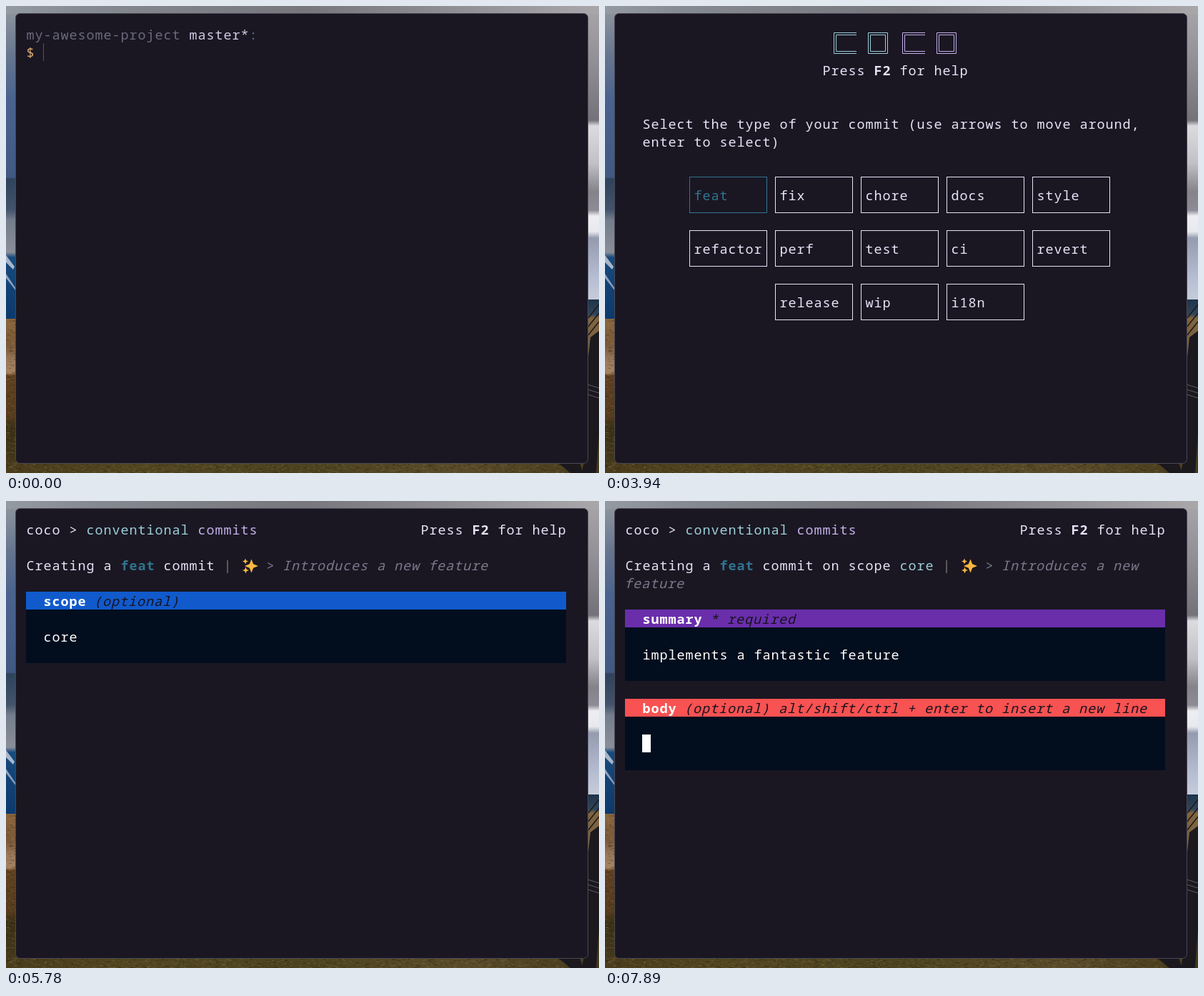
Write an HTML page with a canvas that moves like this. It is 830x654 px and loops after 8 s.

```html
<!DOCTYPE html>
<html lang="en">
<head>
<meta charset="utf-8">
<title>Terminal commit session</title>
<style>
  html, body { margin: 0; width: 100%; height: 100%; overflow: hidden; background: #1a1723; }
  canvas { display: block; }
</style>
</head>
<body>
<canvas id="stage" width="830" height="654"></canvas>
<script>
const LOOP = 8000, CELL_W = 12, CELL_H = 25, LEFT = 28, TOP = 27;
const C = {
  bg: '#1a1723', text: '#e6e3f6', muted: '#7b788a', foam: '#9ccfd8', iris: '#c4b0e8',
  pine: '#31748f', gold: '#dfae6c', white: '#ffffff', field: '#020d1d',
  blue: '#115acc', purple: '#6a2eab', red: '#f85252', ink: '#17131f'
};
const stage = document.getElementById('stage');
const backdrop = document.createElement('canvas');
backdrop.width = 830;
backdrop.height = 654;
let ctx;

const colX = col => LEFT + col * CELL_W;
const rowY = row => TOP + row * CELL_H;

function rect(x, y, w, h, color) {
  ctx.fillStyle = color;
  ctx.fillRect(x, y, w, h);
}

function polygon(color, ...points) {
  ctx.fillStyle = color;
  ctx.beginPath();
  points.forEach(([x, y]) => ctx.lineTo(x, y));
  ctx.fill();
}

function gradient(x, y, w, h, vertical, stops) {
  const g = vertical ? ctx.createLinearGradient(0, y, 0, y + h) : ctx.createLinearGradient(x, 0, x + w, 0);
  stops.forEach(([at, color]) => g.addColorStop((at - (vertical ? y : x)) / (vertical ? h : w), color));
  rect(x, y, w, h, g);
}

let seed = 9;
const random = () => (seed = seed * 16807 % 2147483647) / 2147483647;

function speckle(x, y, w, h, count, dark, light) {
  for (let i = 0; i < count; i++) {
    rect(x + random() * w, y + random() * h, 1 + random() * 4, 1, random() < .5 ? dark : light);
  }
}

// Terminal text: one glyph per grid cell.
function print(row, col, text, color = C.text, style = '500') {
  const slant = style === 'italic' ? -1.5 : 0;
  ctx.font = `${style} 18.5px "Noto Sans Mono", monospace`;
  ctx.textAlign = 'center';
  ctx.fillStyle = color;
  [...text].forEach((ch, i) => ctx.fillText(ch, colX(col + i) + CELL_W / 2 + slant, rowY(row) + 20));
  return col + text.length;
}

function paintBackdrop() {
  ctx = backdrop.getContext('2d');
  gradient(0, 0, 830, 12, false, [[0, '#949aa3'], [120, '#858991'], [420, '#77777d'], [650, '#929196'], [830, '#a9a7aa']]);
  gradient(0, 11, 15, 427, true, [[11, '#8b929c'], [70, '#66758f'], [130, '#4a638e'], [240, '#405983'],
    [242, '#30435c'], [285, '#42536b'], [300, '#747d8c'], [345, '#8a8e98'], [352, '#174a7c'], [438, '#0c396d']]);
  polygon('#a9b6c9', [0, 349], [12, 365], [10, 369], [0, 359]);
  polygon('#8ea2bd', [0, 375], [14, 396], [14, 399], [0, 381]);
  gradient(0, 438, 15, 216, true, [[438, '#8a653d'], [475, '#795837'], [495, '#97775a'], [514, '#a58360'],
    [517, '#5f4020'], [575, '#573c1e'], [590, '#383015'], [654, '#4a3c1d']]);
  gradient(813, 11, 17, 400, true, [[11, '#a5a3a7'], [80, '#918f95'], [160, '#747179'], [168, '#dcdcdf'],
    [220, '#c2c1c6'], [260, '#85828a'], [286, '#8d8b95'], [294, '#eeeef2'], [316, '#e8e9ee'],
    [325, '#959baf'], [380, '#b5bdd2'], [411, '#c6ccda']]);
  gradient(813, 411, 17, 243, true, [[411, '#1d344b'], [432, '#314558'], [437, '#80643d'],
    [500, '#756044'], [570, '#594525'], [654, '#403718']]);
  gradient(0, 639, 830, 15, false, [[0, '#493b1c'], [150, '#514620'], [420, '#4d4320'], [650, '#5a4c2b'], [830, '#463b1b']]);
  speckle(0, 641, 830, 13, 900, '#2f2a1480', '#786a3980');
  speckle(0, 438, 14, 203, 260, '#3a291460', '#b08a5840');

  const dark = '#1b191e';
  polygon(dark, [830, 455], [818, 464], [814, 500], [814, 610], [806, 654], [826, 654], [830, 600]);
  polygon(dark, [773, 640], [803, 640], [808, 654], [790, 654]);
  ctx.lineWidth = 1.5;
  ctx.strokeStyle = dark;
  ctx.beginPath();
  for (const y of [438, 450, 462]) {
    ctx.moveTo(814, y);
    ctx.lineTo(830, y - 20);
  }
  ctx.stroke();
  ctx.lineWidth = 1;
  ctx.strokeStyle = '#5c5c64';
  ctx.beginPath();
  for (const y of [530, 537, 544]) {
    ctx.moveTo(814, y);
    ctx.lineTo(830, y + 5);
  }
  ctx.stroke();

  ctx.fillStyle = C.bg;
  ctx.strokeStyle = '#4a4853';
  ctx.beginPath();
  ctx.roundRect(13.5, 10.5, 801, 630, 6);
  ctx.fill();
  ctx.stroke();
}

const ramp = (from, to, count) => Array.from({ length: count }, (_, i) => from + (to - from) * i / (count - 1));
const passed = (times, t) => times.filter(at => t >= at).length;

const COMMAND_KEYS = ramp(70, 330, 4);
const SCOPE_KEYS = [5260, 5390, 5520, 5520];
const SUMMARY = 'implements a fantastic feature';
const SUMMARY_KEYS = [...ramp(6350, 6470, 3), ...ramp(6530, 6830, 10),
  ...ramp(6990, 7290, 7), 7310, 7360, 7410, ...ramp(7570, 7810, 7)];
const MOVES = [[1610, 1], [1740, 2], [1870, 3], [2140, 2], [2340, 1], [2470, 0]];
const TYPES = [
  [7, 'feat fix chore docs style'],
  [7, 'refactor perf test ci revert'],
  [17, 'release wip i18n']
];

function drawPrompt(t) {
  print(0, 0, 'my-awesome-project', '#6b6a7a');
  print(0, 19, 'master*', '#d0cbe6');
  print(0, 26, ':', '#527293');
  print(1, 0, '$', C.gold);
  const end = print(1, 2, 'coco'.slice(0, passed(COMMAND_KEYS, t)));
  const entered = t >= 530;
  rect(colX(entered ? 0 : end), rowY(entered ? 2 : 1), 1, CELL_H, '#55525f');
}

function drawHelp(row, col) {
  print(row, col, 'Press');
  print(row, col + 6, 'F2', C.text, 'bold');
  print(row, col + 9, 'for help');
}

function bannerLetter(col, closed, color) {
  const x = colX(col) + 4.5;
  ctx.strokeStyle = color;
  ctx.lineWidth = 1;
  for (const inset of [0, 3]) {
    const left = x + inset, top = 37.5 + inset, bottom = 66.5 - inset;
    const right = closed ? x + 27 - inset : x + 31.5;
    ctx.beginPath();
    ctx.moveTo(right, top);
    ctx.lineTo(left, top);
    ctx.lineTo(left, bottom);
    ctx.lineTo(right, bottom);
    if (closed) ctx.closePath();
    ctx.stroke();
  }
}

function drawPicker(t) {
  [24, 28, 32, 36].forEach((col, i) => bannerLetter(col, i % 2 === 1, i < 2 ? C.foam : C.iris));
  drawHelp(2, 23);
  print(5, 2, 'Select the type of your commit (use arrows to move around,');
  print(6, 2, 'enter to select)');

  const selected = MOVES.reduce((index, [at, next]) => t >= at ? next : index, 0);
  const active = t >= 3940 ? C.pine : C.foam;
  TYPES.forEach(([firstCol, names], line) => names.split(' ').forEach((name, i) => {
    const col = firstCol + i * 10, row = 8 + line * 3;
    const color = line === 0 && i === selected ? active : C.text;
    ctx.strokeStyle = color;
    ctx.lineWidth = 1;
    ctx.strokeRect(colX(col) + 6.5, rowY(row) + 12.5, 108, 50);
    print(row + 1, col + 1, name, color);
  }));
}

function star(x, y, r) {
  ctx.fillStyle = '#fcb83f';
  ctx.beginPath();
  for (let i = 0; i < 8; i++) {
    const radius = i % 2 ? r * .4 : r, angle = i * Math.PI / 4;
    ctx.lineTo(x + radius * Math.sin(angle), y - radius * Math.cos(angle));
  }
  ctx.fill();
}

function drawField(row, color, label, hint, value, focused) {
  rect(LEFT, rowY(row), 756, CELL_H, color);
  rect(LEFT, rowY(row + 1), 756, 3 * CELL_H, C.field);
  const end = print(row, 2, label, C.white, 'bold');
  print(row, end + 1, hint, C.ink, 'italic');
  const caret = print(row + 2, 2, value, C.white);
  if (focused) rect(colX(caret), rowY(row + 2), CELL_W, CELL_H, C.white);
}

function drawForm(t) {
  const scoped = t >= 5850;
  print(0, 0, 'coco >');
  print(0, 7, 'conventional', C.foam);
  print(0, 20, 'commits', C.iris);
  drawHelp(0, 46);

  print(2, 0, 'Creating a');
  print(2, 11, 'feat', C.pine, 'bold');
  let col = print(2, 16, 'commit') + 1;
  if (scoped) {
    print(2, col, 'on scope');
    col = print(2, col + 9, 'core', C.foam) + 1;
  }
  print(2, col, '|', '#80766f');
  const sparkle = colX(col + 2);
  star(sparkle + 15.5, 91, 9.5);
  star(sparkle + 7, 84.5, 4);
  star(sparkle + 7.5, 97, 4.5);
  print(2, col + 5, '>', C.muted);
  print(2, col + 7, 'Introduces a new' + (scoped ? '' : ' feature'), C.muted, 'italic');

  if (!scoped) {
    drawField(4, C.blue, 'scope', '(optional)', 'core'.slice(0, passed(SCOPE_KEYS, t)), t < 5780);
    return;
  }
  const bodyOpen = t >= 7890;
  print(3, 0, 'feature', C.muted, 'italic');
  drawField(5, C.purple, 'summary', '* required', SUMMARY.slice(0, passed(SUMMARY_KEYS, t)), !bodyOpen);
  if (bodyOpen) {
    drawField(10, C.red, 'body', '(optional) alt/shift/ctrl + enter to insert a new line', '', true);
  }
}

function frame() {
  const t = (performance.now() - start) % LOOP;
  ctx.drawImage(backdrop, 0, 0);
  if (t < 800) drawPrompt(t);
  else if (t >= 4000) drawForm(t);
  else if (t >= 880) drawPicker(t);
  requestAnimationFrame(frame);
}

paintBackdrop();
ctx = stage.getContext('2d');
const start = performance.now();
frame();
</script>
</body>
</html>
```
